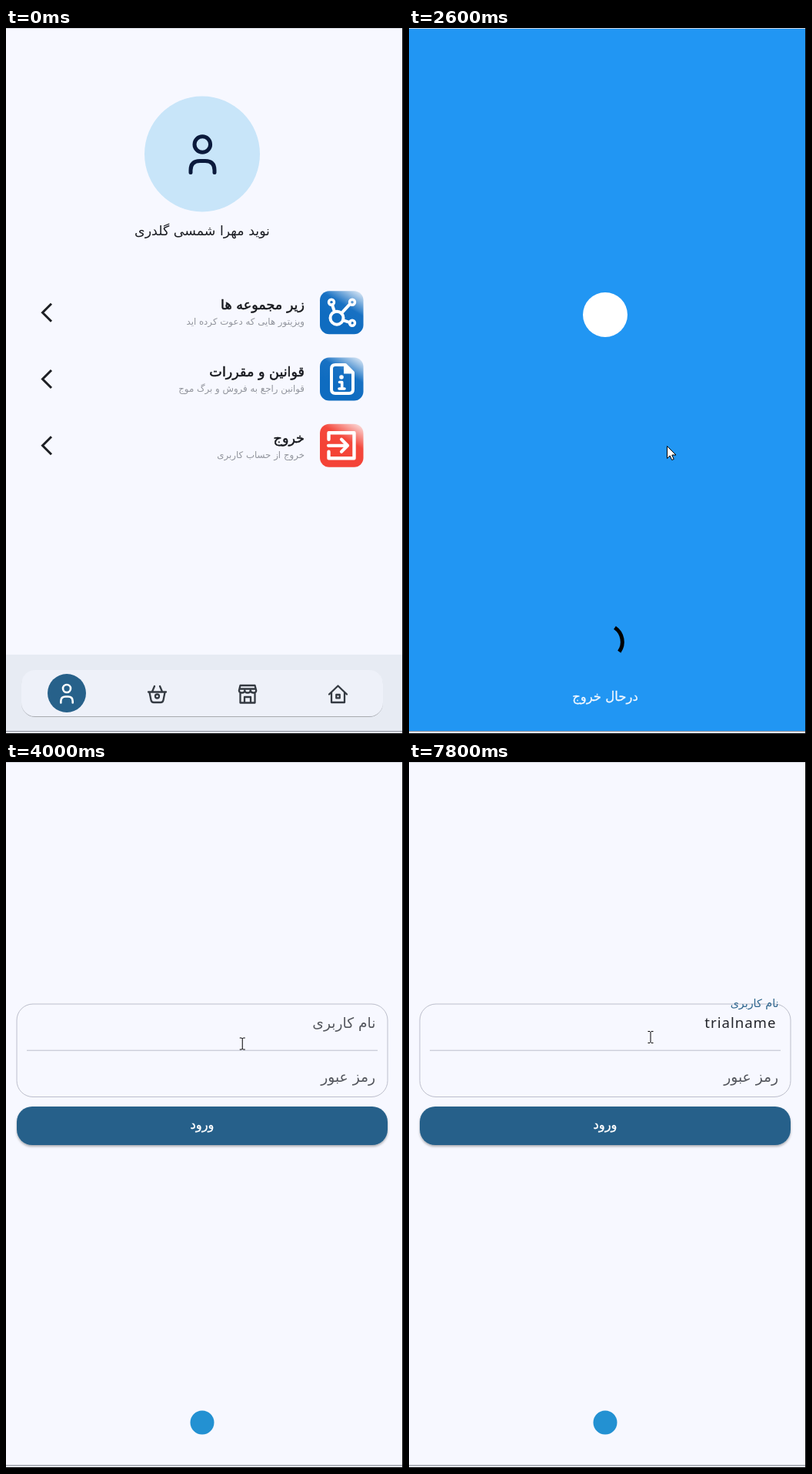
Animation of 516x916 px, one loop 8 s. Source, as an HTML page:

```html
<!DOCTYPE html>
<html lang="fa">
<head>
<meta charset="utf-8">
<title>App screens</title>
<style>
  html, body { margin: 0; width: 100%; height: 100%; overflow: hidden; background: #f7f8ff; }
  svg { display: block; width: 100vw; height: 100vh; }
  text { font-family: "DejaVu Sans", sans-serif; text-anchor: end; }
  .mid { text-anchor: middle; }
  .title { font-size: 17.6px; fill: #16181d; stroke: #16181d; stroke-width: .5; }
  .sub { font-size: 11.8px; fill: #92959d; }
  .field { font-size: 18.7px; fill: #54575e; }
  .typed { font: 18.6px "Noto Sans", "Open Sans", sans-serif; letter-spacing: 1px; fill: #22242a; }
  .line { fill: none; stroke-linecap: round; stroke-linejoin: round; }
  .white { stroke: #fff; }
  .nav { stroke: #343a42; stroke-width: 2.3; }
</style>
</head>
<body>
<svg viewBox="0 0 516 916" preserveAspectRatio="none" xmlns="http://www.w3.org/2000/svg">
  <defs>
    <linearGradient id="blue" x1=".95" y1="0" x2=".5" y2=".75">
      <stop offset="0" stop-color="#e3edf8"/>
      <stop offset=".55" stop-color="#1871c3"/>
      <stop offset="1" stop-color="#0f6cc0"/>
    </linearGradient>
    <linearGradient id="red" x1=".95" y1="0" x2=".5" y2=".75">
      <stop offset="0" stop-color="#fbe3e2"/>
      <stop offset=".55" stop-color="#f4483c"/>
      <stop offset="1" stop-color="#f44336"/>
    </linearGradient>
    <filter id="shadow" x="-5%" y="-20%" width="110%" height="150%">
      <feDropShadow dx="0" dy="2" stdDeviation="1.6" flood-color="#000" flood-opacity=".3"/>
    </filter>
    <filter id="soft" x="-5%" y="-20%" width="110%" height="150%">
      <feDropShadow dx="0" dy="1" stdDeviation=".7" flood-color="#000" flood-opacity=".28"/>
    </filter>
  </defs>

  <g id="profile">
    <rect width="516" height="916" fill="#f7f8ff"/>
    <circle cx="255" cy="163.5" r="75" fill="#c8e5f9"/>
    <g class="line" stroke="#0b1a3c" stroke-width="5">
      <circle cx="255.3" cy="151" r="10.3"/>
      <path d="M240 187.5v-3q0-12 12-12h7q12 0 12 12v3"/>
    </g>
    <text class="mid" x="255" y="269" font-size="17.4" fill="#1b1d22">نوید مهرا شمسی گلدری</text>

    <g id="rows"></g>

    <rect y="813" width="516" height="103" fill="#e7ebf3"/>
    <rect x="20" y="833" width="470" height="60" rx="18" fill="#eef1f9" filter="url(#soft)"/>
    <circle cx="79" cy="863" r="25" fill="#27618a"/>
    <g class="line white" stroke-width="2.6">
      <circle cx="79" cy="857" r="5"/>
      <path d="M71.3 875.5v-2q0-6 6-6h3.4q6 0 6 6v2"/>
    </g>
    <g class="line nav">
      <path d="M185 861.5h23M186.5 862l2 10q.6 3 3.5 3h9q2.9 0 3.5-3l2-10M190 861l3-7M203 861l-3-7"/>
      <circle cx="196.5" cy="867" r="2.5"/>
      <path d="M304.5 853h19l1.700 6.500q0 3-3.500 3t-4-3q0 3-3.700 3t-3.700-3q0 3-3.700 3t-3.700-3zM304.5 863v12.500h19V863M304 857.500h20M310 875v-7h8v7"/>
      <path d="M420 864.500l11.500-11 11.500 11M423 862.500v12.500h17v-12.500"/>
      <rect x="429.3" y="865" width="4.4" height="4.4"/>
    </g>
  </g>

  <g id="splash">
    <rect width="516" height="916" fill="#2196f3"/>
    <circle cx="255" cy="372" r="29" fill="#fff"/>
    <path id="spin" fill="none" stroke="#000" stroke-width="5"/>
    <text class="mid" x="255" y="873" font-size="16.5" fill="#f2f8ff" stroke="#f2f8ff" stroke-width=".3">درحال خروج</text>
  </g>

  <g id="login">
    <rect width="516" height="916" fill="#1d4068"/>
    <g id="page">
      <rect x="-5" y="1" width="520" height="911" fill="#f7f8ff"/>
      <rect x="14" y="314" width="482" height="120.5" rx="21" fill="none" stroke="#bcbecb"/>
      <path d="M27 374.2h456" stroke="#bcbecb"/>
      <text id="label" class="field">نام کاربری</text>
      <text class="field" x="480" y="414.5">رمز عبور</text>
      <text id="typed" class="typed" x="477.5" y="345"></text>
      <rect id="caret" x="477" y="325" width="2" height="32" fill="#27618a"/>
      <rect x="14" y="447" width="482" height="50" rx="20" fill="#27618a" filter="url(#shadow)"/>
      <text class="mid" x="255" y="475.5" font-size="16.3" fill="#fff" stroke="#fff" stroke-width=".4">ورود</text>
      <circle cx="255" cy="857" r="15.5" fill="#2391d2"/>
    </g>
  </g>

  <path d="M0 .5h516" stroke="#d3d5dd"/>
  <rect y="912" width="516" height="4" fill="#e4e6ee"/>
  <path d="M0 912.5h516" stroke="#8f939c"/>
  <path d="M0 915.5h516M515.5 0v916" stroke="#0a0a0c"/>

  <path id="arrow" d="M0 0v16l3.700-3.500 2.500 5.500 2.500-1.100-2.400-5.400h5.200z" fill="#fff" stroke="#000"/>
  <path id="beam" d="M-3.500-7.500h2.500l1 1 1-1h2.500M0-6.500v13M-3.500 7.500h2.500l1-1 1 1h2.500" fill="none" stroke="#000"/>
</svg>
<script>
  const LOOP = 8000, STEP = 200;
  const el = id => document.getElementById(id);
  const show = (id, on) => el(id).setAttribute("display", on ? "inline" : "none");
  const put = (id, attrs) => {
    for (const k in attrs) el(id).setAttribute(k, attrs[k]);
  };

  // Icons are drawn around the centre of their tile.
  const rows = [
    ["blue", "زیر مجموعه ها", "ویزیتور هایی که دعوت کرده اید",
      `<g class="line white" stroke-width="4"><circle cx="-6" cy="7" r="8.5"/>
       <path d="M-9-1l-3-9M0 1L11-11M2 10l9 3"/></g>
       <g fill="none" stroke="#fff" stroke-width="3.4"><circle cx="-13" cy="-13.5" r="3.5"/>
       <circle cx="14" cy="-13.5" r="3.5"/><circle cx="14" cy="13.5" r="3.5"/></g>`],
    ["blue", "قوانین و مقررات", "قوانین راجع به فروش و برگ موج",
      `<path class="line white" stroke-width="4" d="M5-18.5h-13q-5 0-5 5v27q0 5 5 5h18q5 0 5-5v-22z"/>
       <path d="M3-19l13 12H3z" fill="#fff"/><circle cx="0" cy="-2.5" r="2.8" fill="#fff"/>
       <path class="line white" stroke-width="3.6" d="M-2.5 4H.7v8.500M-3 12.500h7"/>`],
    ["red", "خروج", "خروج از حساب کاربری",
      `<path class="line white" stroke-width="4.4" d="M-16.5-8v-8.500h33v33h-33V8"/>
       <path class="line white" stroke-width="4.2" d="M-17 0H7M0-8l8 8-8 8"/>`]
  ];

  el("rows").innerHTML = rows.map(([tone, title, sub, icon], i) => {
    const y = 369.2 + i * 86.3;
    return `<g id="row${i}">
      <path d="M59 ${y - 11.5}l-11.500 11.500 11.500 11.500" fill="none" stroke="#1d1f24" stroke-width="3"/>
      <text class="title" x="388" y="${y - 4}">${title}</text>
      <text class="sub" x="388" y="${y + 16}">${sub}</text>
      <rect x="408" y="${y - 28}" width="56.5" height="56" rx="12" fill="url(#${tone})"/>
      <g transform="translate(436 ${y})">${icon}</g></g>`;
  }).join("");

  // Pointer route: time, x, y
  const route = [
    [600, 392, 672], [1000, 368, 612], [1600, 343, 554], [2000, 335.5, 542.5],
    [2600, 335.5, 542.5], [3400, 307.5, 414.5], [3600, 314, 407], [3800, 311, 392],
    [4200, 303.5, 339], [7200, 303.5, 339], [7800, 314, 357]
  ];
  // Arc start and sweep in degrees, one pair per step
  const arcs = [[-56, 91], [-12, 232], [33, 269], [126, 223], [-34, 88]];
  const word = "trialname";
  const strokes = [5400, 5600, 5600, 5800, 5800, 6400, 6600, 7000, 7400];

  const mix = (a, b, k) => a + (b - a) * k;
  const clamp = k => Math.min(1, Math.max(0, k));

  function along(t) {
    let i = 0;
    while (i < route.length - 2 && route[i + 1][0] <= t) i++;
    const a = route[i], b = route[i + 1];
    const k = clamp((t - a[0]) / (b[0] - a[0]));
    return [mix(a[1], b[1], k), mix(a[2], b[2], k)];
  }

  function arc(cx, cy, r, [start, sweep]) {
    const at = deg => {
      const a = deg * Math.PI / 180;
      return (cx + r * Math.cos(a)).toFixed(2) + " " + (cy + r * Math.sin(a)).toFixed(2);
    };
    return `M${at(start)}A${r} ${r} 0 ${+(sweep > 180)} 1 ${at(start + sweep)}`;
  }

  const zoom = (cx, cy, s) => `translate(${cx} ${cy}) scale(${s}) translate(${-cx} ${-cy})`;

  function draw(t) {
    const scene = t < 2600 ? "profile" : t < 3600 ? "splash" : "login";
    for (const id of ["profile", "splash", "login"]) show(id, id === scene);

    put("row2", { transform: zoom(255, 541.8, t >= 2400 ? .931 : 1) });

    if (scene === "splash") {
      put("spin", { d: arc(255, 796.5, 22.3, arcs[Math.floor((t - 2600) / STEP)]) });
    }

    if (scene === "login") {
      put("page", { transform: zoom(255, 456, t < 3800 ? .9917 : 1) });
      const k = clamp((t - 4000) / 400);
      const size = mix(18.7, 14.3, k);
      put("label", { x: 480.5, y: mix(344.5, 318, k), style: `font-size:${size}px;fill:${k ? "#2f668e" : "#54575e"}` });
      show("caret", t >= 4400 && t < 4800);
      el("typed").textContent = word.slice(0, strokes.filter(s => s <= t).length);
    }

    const [x, y] = along(t), place = `translate(${x} ${y})`;
    show("arrow", t >= 600 && scene !== "login");
    show("beam", scene === "login");
    put("arrow", { transform: place });
    put("beam", { transform: place });
  }

  function tick() {
    const t = performance.now() % LOOP;
    draw(Math.floor(t / STEP) * STEP);
    requestAnimationFrame(tick);
  }
  tick();
</script>
</body>
</html>
```
